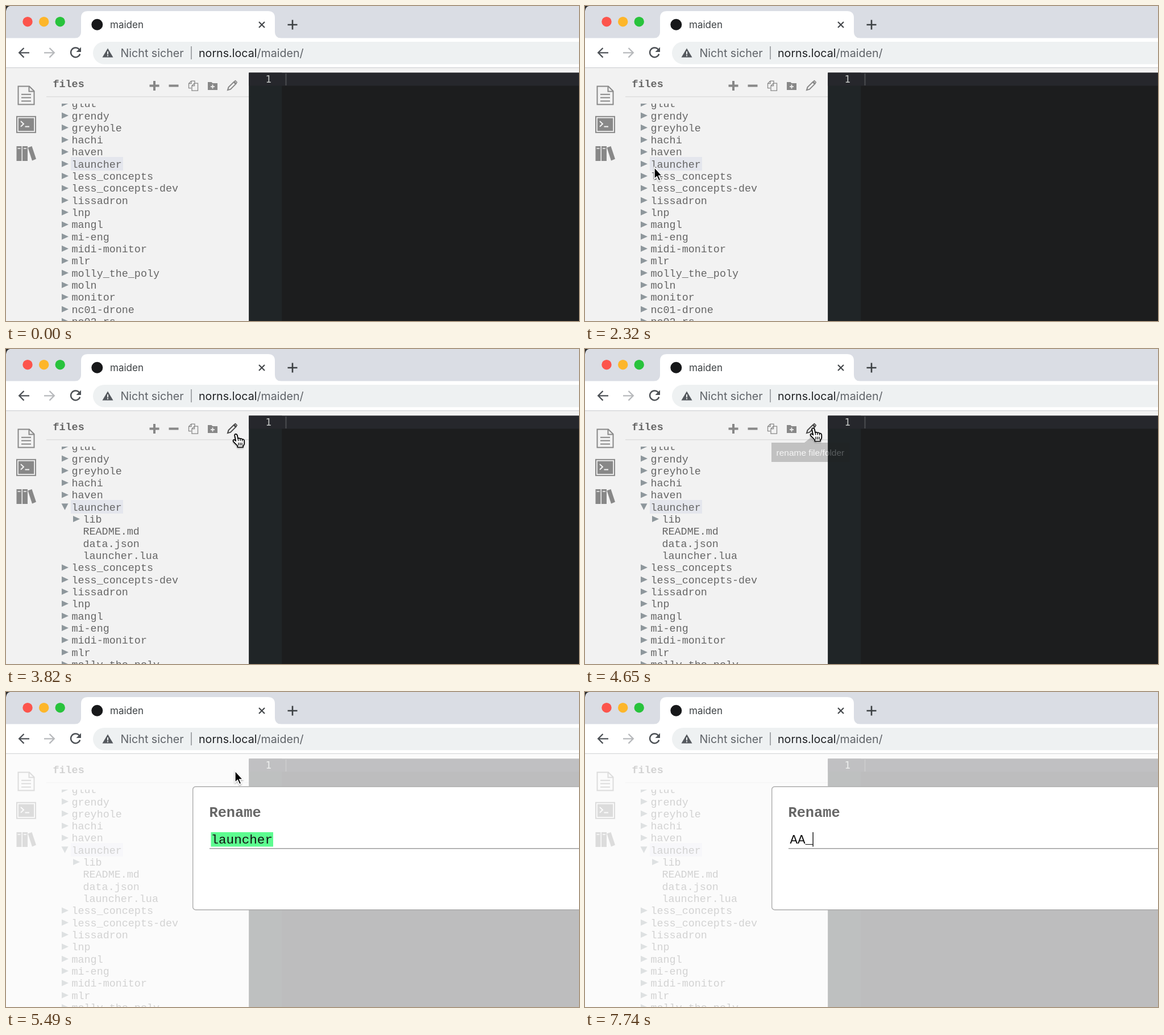
Animation, 1008 px wide and 555 px high, one loop 8 s. Source, as an HTML page:

```html
<!DOCTYPE html>
<html lang="de">
<head>
<meta charset="utf-8">
<title>maiden</title>
<style>
html, body { margin: 0; width: 100%; height: 100%; overflow: hidden; background: #f2f2f2; }
svg { display: block; width: 1008px; height: 555px; }
.ui { font: 19.65px Inter, Roboto, sans-serif; }
.mono { font: 18.4px "Liberation Mono", "DejaVu Sans Mono", monospace; fill: #666; }
.bold { font-weight: bold; }
.line { fill: none; stroke-linecap: butt; }
</style>
</head>
<body>
<svg viewBox="0 0 1008 555" xmlns="http://www.w3.org/2000/svg">
  <defs>
    <clipPath id="treeClip"><rect x="72" y="172" width="355" height="383"/></clipPath>
    <filter id="shadow" x="-50%" y="-50%" width="200%" height="200%">
      <feDropShadow dx="0" dy="1.5" stdDeviation="1.2" flood-opacity=".35"/>
    </filter>
  </defs>

  <!-- browser chrome -->
  <rect width="1008" height="57" fill="#dadde4"/>
  <path d="M0 0H7Q1 1 0 9Z" fill="#2b2c2e"/>
  <circle cx="38" cy="27.700" r="8.700" fill="#fc544c"/>
  <circle cx="66.700" cy="27.700" r="8.700" fill="#fdb62a"/>
  <circle cx="95.200" cy="27.700" r="8.700" fill="#28c33c"/>
  <rect y="56.500" width="1008" height="52.500" fill="#fff"/>
  <path d="M121 57Q132 56 132 45V21Q132 9 144 9H461Q473 9 473 21V45Q473 56 484 57Z" fill="#fff"/>
  <circle cx="160.300" cy="32.700" r="10" fill="#17181a"/>
  <text class="ui" x="183" y="38.500" style="font-size:17px" fill="#3c4043">maiden</text>
  <path class="line" d="M445 28L455 38M455 28L445 38" stroke="#45484c" stroke-width="2.2"/>
  <path class="line" d="M504 24.500V41.500M495.500 33H512.500" stroke="#3c4043" stroke-width="2.600"/>
  <path class="line" d="M41 82.300H24M31.500 74L23.200 82.300L31.500 90.600" stroke="#4d5156" stroke-width="2.300"/>
  <path class="line" d="M67 82.300H84M76.500 74L84.800 82.300L76.500 90.600" stroke="#b7b9bc" stroke-width="2.300"/>
  <path class="line" d="M128.500 76.300A8.300 8.300 0 1 0 130.200 84.500" stroke="#4d5156" stroke-width="2.400"/>
  <path d="M132 72.500V81H123.500Z" fill="#4d5156"/>
  <rect x="153" y="63" width="900" height="39.500" rx="19.750" fill="#eef1f2"/>
  <path d="M179 74.500L188.500 90.500H169.500Z" fill="#55595e"/>
  <path d="M178 80H180V85.200H178ZM178 86.600H180V88.600H178Z" fill="#eef1f2"/>
  <text class="ui" x="201.500" y="89.500" fill="#5f6368">Nicht sicher</text>
  <path d="M326 71V94" stroke="#8b8e92" stroke-width="1.500"/>
  <text class="ui" x="339" y="89.500" fill="#1f2124">norns.local<tspan fill="#5f6368">/maiden/</tspan></text>

  <!-- page -->
  <rect y="109" width="1008" height="446" fill="#f2f2f2"/>
  <rect y="108" width="1008" height="1.300" fill="#d3d5d7"/>
  <rect x="427.400" y="117.600" width="581" height="438" fill="#1c1d1e"/>
  <rect x="427.400" y="117.600" width="58" height="438" fill="#202527"/>
  <rect x="427.400" y="117.600" width="581" height="22.900" fill="#26272c"/>
  <text x="456.500" y="135" fill="#c5c8c6" style="font:17.500px 'DejaVu Sans Mono',monospace">1</text>
  <rect x="491.500" y="119" width="2" height="21" fill="#4b4d50"/>

  <g fill="none" stroke="#888">
    <path d="M21.500 141.500H41L49.500 150V173.500H21.500Z" stroke-width="2"/>
    <path d="M40.500 141.500V150.500H49.500" stroke-width="2"/>
    <path d="M27 155.800H44M27 161.600H44M27 167.400H44" stroke-width="2"/>
    <rect x="19" y="194.800" width="33" height="28" stroke-width="2"/>
  </g>
  <rect x="21.800" y="197.600" width="27.400" height="22.400" fill="#888"/>
  <path class="line" d="M26 203L31 207.700L26 212.500M33.500 212.500H41" stroke="#f2f2f2" stroke-width="2"/>
  <g fill="#888">
    <path d="M18.500 247H27.500V273H18.500ZM29 247H38V273H29ZM38.500 249.500L45.500 247L53 269.500L46 272.500Z"/>
    <path d="M20.500 251H25.500M31 251H36" stroke="#f2f2f2" stroke-width="1.500"/>
  </g>

  <text class="mono bold" x="82.500" y="143">files</text>
  <rect x="71" y="159" width="356" height="1.500" fill="#dedede"/>
  <g id="tools" fill="none" stroke="#888" transform="translate(0 -.4)">
    <path d="M261 132.500V149.500M252.500 141H269.500M286.500 141H303.500" stroke-width="4"/>
    <path d="M326 145H321.500V137L326 132.500H332V137M326 132.500V137H321.500M327 149.500V141L331.500 136.500H337.500V149.500ZM331.500 136.500V141H327" stroke-width="1.300"/>
    <path d="M355 134.500H361.500L363.500 136.500H372V148.500H355Z" fill="#888" stroke="none"/>
    <path d="M363.500 139V146M360 142.500H367" stroke="#f2f2f2" stroke-width="1.800"/>
    <g id="pen" stroke="#888">
      <path d="M390 148.500L391.500 143.500L400.500 134.500L404 138L395 147Z" stroke-width="2"/>
      <path d="M401.500 133.500L403.500 132L406.300 134.800L405 137Z" stroke-width="1.500"/>
    </g>
  </g>
  <g clip-path="url(#treeClip)">
    <rect x="114" y="266" width="92" height="24" fill="#e4e6ed"/>
    <g id="tree"></g>
  </g>

  <g id="tip">
    <path d="M328 165H386L397 156L408 165H465.500V199H328Z" fill="#222" fill-opacity=".93"/>
    <text x="336.500" y="187.500" fill="#fff" style="font:15.500px 'Liberation Sans',Arial,sans-serif">rename file/folder</text>
  </g>

  <g id="modal">
    <rect y="109" width="1008" height="446" fill="#fff" fill-opacity=".71"/>
    <rect x="328.700" y="166.700" width="720" height="217" rx="5" fill="#fff" stroke="#acacac" stroke-width="1.400"/>
    <text class="mono bold" x="357.500" y="220" style="font-size:25.300px">Rename</text>
    <rect x="358" y="275" width="650" height="1.500" fill="#9c9c9c"/>
    <rect id="sel" x="360.500" y="247" width="109.500" height="25.500" fill="#5dfc90"/>
    <text id="field" class="mono" x="360.500" y="266.500" style="font-size:22.600px;fill:#111"></text>
    <rect id="caret" y="247" width="1.500" height="25.500" fill="#222"/>
  </g>

  <g id="cursor" filter="url(#shadow)">
    <path id="arrow" d="M0 0V22.500L5 18L8.700 26.300L12.200 24.700L8.700 16.700H15.300Z"
      transform="translate(.9 1) scale(.9)" fill="#000" stroke="#fff" stroke-width="1.700"/>
    <g id="hand" stroke-linejoin="round" stroke-linecap="round">
      <path d="M-2.300 2.500Q-2.300 .3 -.3 .3Q1.800 .3 2.300 2.800L3.600 8.500Q5.500 6.700 7.300 8.800Q9.500 7.300 11 9.800Q14.500 9 14.700 12.500V17Q14.500 19.500 12.500 21V23.500H2.800V21L-4.300 13.800Q-5.800 11.500 -4 10.500Q-2.500 10 -.2 12.500Z"
        fill="#fff" stroke="#000" stroke-width="1.700"/>
      <path d="M3.700 8.500L4.200 12M7.400 9L7.700 12M11 10L11.100 12.500M4.500 16V20M7.500 16V20M10.500 16V20" fill="none" stroke="#000" stroke-width="1.300"/>
    </g>
  </g>
</svg>
<script>
const LOOP = 8000, ROW = 21.32, CH = 13.56;
const OPEN = 2740, MODAL = 5490, TYPE = 6650;
const $ = id => document.getElementById(id);
const show = (id, on) => $(id).setAttribute('display', on ? 'inline' : 'none');

const folders = ('glut grendy greyhole hachi haven launcher less_concepts less_concepts-dev lissadron lnp ' +
  'mangl mi-eng midi-monitor mlr molly_the_poly moln monitor nc01-drone nc02-rs').split(' ');
const children = ['lib', 'README.md', 'data.json', 'launcher.lua'];

function row(name, i, x, mark) {
  const y = 172.7 + i * ROW;
  const shape = { right: `M${x} ${y - 6.5}L${x + 12} ${y - 1}L${x} ${y + 4.5}Z`,
                  down: `M${x - .5} ${y - 7}H${x + 11.5}L${x + 5.5} ${y + 4.5}Z` }[mark];
  return (shape ? `<path d="${shape}" fill="#8e979c"/>` : '') +
    `<text class="mono" x="${x + 17.5}" y="${y + 5.5}">${name}</text>`;
}

function drawTree(open) {
  const at = folders.indexOf('launcher');
  let html = folders.map((n, i) => row(n, open && i > at ? i + children.length : i, 98,
    open && i === at ? 'down' : 'right')).join('');
  if (open) html += children.map((n, i) => row(n, at + 1 + i, 118, i ? '' : 'right')).join('');
  $('tree').innerHTML = html;
}

// time, x, y, shape
const path = [
  [1570, 300, 345, 'arrow'], [1990, 175, 300, 'arrow'], [2150, 175, 300, 'arrow'],
  [2490, 104, 278, 'hand'], [2990, 104, 278, 'hand'], [3070, 334, 199, 'arrow'],
  [3820, 404.5, 149.5, 'hand'], [3980, 404.5, 149.5, 'hand'], [4150, 401.5, 139, 'hand'],
  [MODAL, 402, 138, 'arrow'], [TYPE, 402, 138, 'none']
];
// time, text, caret
const typed = [
  [0, 'launcher', 0], [TYPE, 'A', 0], [6820, 'A', 1], [6990, 'AA', 0],
  [7070, 'AA', 1], [7570, 'AA_', 0], [7740, 'AA_', 1]
];
const fade = [[0, 0], [4650, .25], [4820, .75], [4900, 1], [MODAL, 0]];
const last = (table, t) => table.filter(s => s[0] <= t).pop();

function pointer(t) {
  const tick = Math.floor((t + 14) / (1000 / 12)) * 1000 / 12 - 10;
  const now = t >= MODAL ? t : tick;
  const a = last(path, now);
  if (!a) return { x: 0, y: 0, shape: 'none' };
  const b = path[path.indexOf(a) + 1] || a;
  // a stop longer than half a second only ends in a jump
  const glide = b[0] - a[0] < 1000 && b !== a;
  const p = glide ? (now - a[0]) / (b[0] - a[0]) : 0;
  const e = p * (2 - p);
  return { x: a[1] + (b[1] - a[1]) * e, y: a[2] + (b[2] - a[2]) * e, shape: a[3] };
}

let wasOpen = null;
function draw() {
  const t = performance.now() % LOOP;
  const open = t >= OPEN, modal = t >= MODAL;
  if (open !== wasOpen) drawTree(wasOpen = open);

  const c = pointer(t);
  const overPen = c.shape !== 'none' && t > 3070 && c.y < 152;
  const shape = overPen && !modal ? 'hand' : c.shape;
  $('cursor').setAttribute('transform', `translate(${c.x} ${c.y})`);
  show('arrow', shape === 'arrow');
  show('hand', shape === 'hand');
  $('pen').setAttribute('stroke', overPen ? '#484848' : '#888');
  $('tip').setAttribute('opacity', last(fade, t)[1]);

  show('tools', !modal);
  show('modal', modal);
  const [, text, caret] = last(typed, t);
  $('field').textContent = text;
  show('sel', t < TYPE);
  show('caret', caret);
  $('caret').setAttribute('x', 359.7 + text.length * CH);
  requestAnimationFrame(draw);
}
draw();
</script>
</body>
</html>
```
